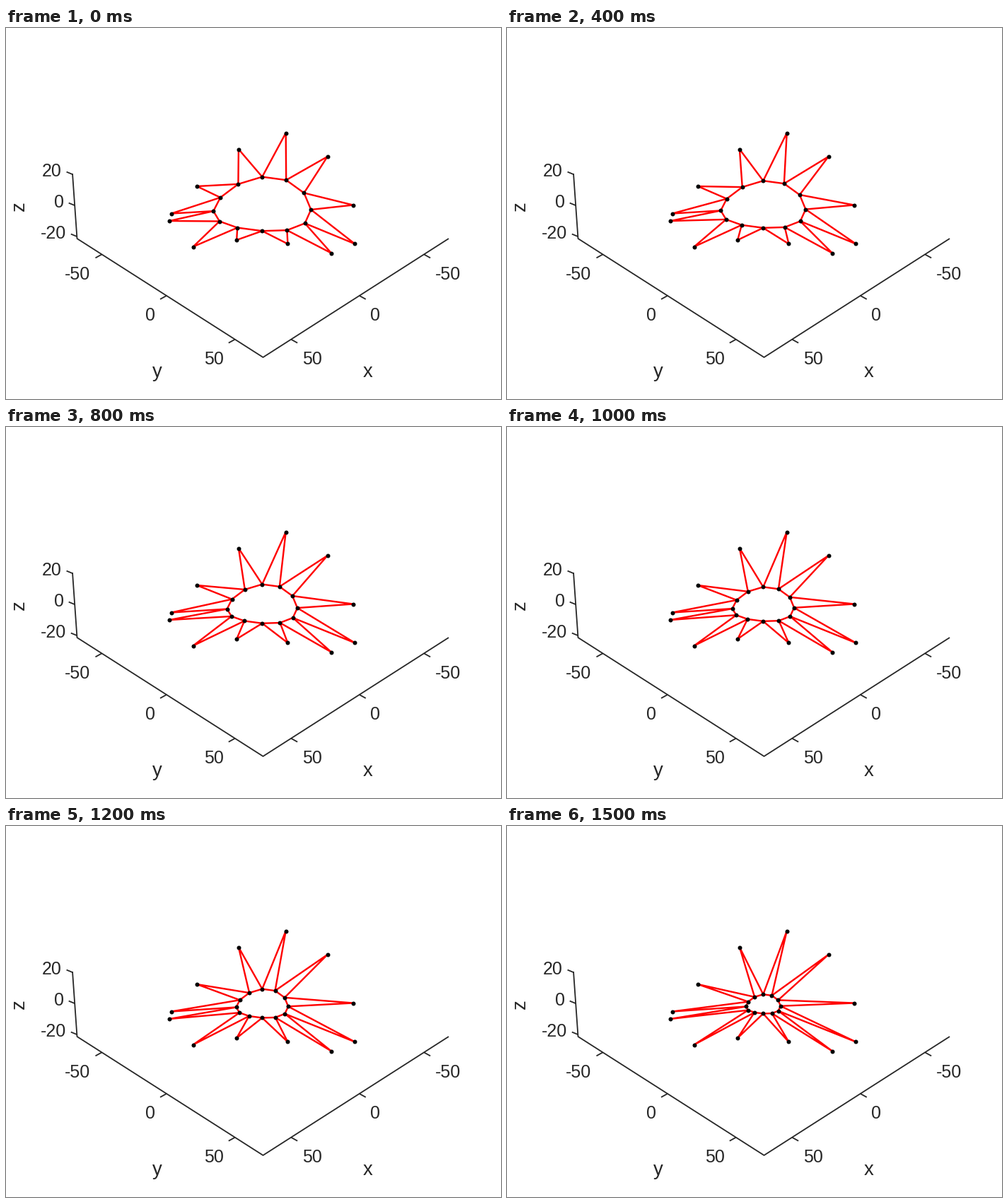
Write a matplotlib script that moves like this. It is 700 by 525 pixels and loops after 1600 ms.

```python
import numpy as np
import matplotlib.pyplot as plt
from matplotlib.animation import FuncAnimation

W, H, DPI = 700, 525, 100
FRAMES, INTERVAL = 16, 100
INK = "#262626"
PX = 72 / DPI  # points per pixel

CENTER = np.array([362.3, 253.5])
N = 12
JOINT_R, TIP_R = 69, 134.3
JOINT_ANGLES = np.arange(N) * 2 * np.pi / N
TIP_ANGLES = JOINT_ANGLES + np.pi / N
# Irregular drop of each spike tip below the base plane
TIP_DROPS = np.array([-33, -18.8, 16.3, 32.7, 12.3, -20,
                      -25.5, 3.3, 0.2, 28.3, 23.2, -10])

fig = plt.figure(figsize=(W / DPI, H / DPI), dpi=DPI, facecolor="white")
ax = fig.add_axes([0, 0, 1, 1])
ax.set_xlim(0, W)
ax.set_ylim(H, 0)
ax.axis("off")


def stroke(points, color=INK, width=1.8):
    x, y = np.transpose(points)
    return ax.plot(x, y, color=color, lw=width * PX,
                   solid_capstyle="butt", solid_joinstyle="round")[0]


def label(x, baseline, text, size=25, ha="center", **kw):
    ax.text(x, baseline, text, fontsize=size * PX, color=INK, ha=ha,
            va="baseline", family="Liberation Sans", **kw)


def ticked_axis(start, end, values, place, tick, offset, ha):
    """Ticks and numbers on the line start-end; place maps value to 0..1."""
    start, end = np.array(start), np.array(end)
    for v in values:
        p = start + place(v) * (end - start)
        stroke([p, p + tick])
        label(*(p + offset), str(v), ha=ha)


def project(angle, radius, drop):
    """Tilted circle on screen, slightly wider towards the viewer."""
    x = radius * np.sin(angle) * (1 - 0.0003 * radius * np.cos(angle))
    y = -0.555 * radius * np.cos(angle) + drop
    return CENTER + np.stack([x, y], axis=1)


def joints_at(scale):
    r = JOINT_R * scale
    a = JOINT_ANGLES
    saddle = -r * (0.077 * np.cos(2 * a - 0.53) + 0.015 * np.sin(a))
    return project(a, r, saddle)


def closed_loop(points):
    return np.vstack([points, points[:1]])


# Axes
TOP, LEFT, CORNER, RIGHT = (94, 206), (100.5, 298), (363.5, 466), (626, 298)
stroke([TOP, LEFT, CORNER, RIGHT])


def depth(v):
    return 0.481 + 0.00716 * v + 4e-6 * v * v


ticked_axis(TOP, LEFT, (20, 0, -20), lambda v: 0.49 - 0.0239 * v,
            (-8.5, -3.5), (-15.5, 3), "right")
ticked_axis(LEFT, CORNER, (-50, 0, 50), depth, (-9, 5), (-16, 35.5), "right")
ticked_axis(RIGHT, CORNER, (-50, 0, 50), depth, (9, 5), (15.5, 35.5), "left")
label(214, 494, "y", 27.5)
label(512, 494, "x", 27.5)
label(26, 252, "z", 27.5, rotation=90, rotation_mode="anchor")

# Linkage
tips = project(TIP_ANGLES, TIP_R, TIP_DROPS)
spikes = stroke(tips, "red", 2.4)
ring = stroke(tips, "red", 2.4)
dots, = ax.plot([], [], "o", color="black", ms=6 * PX, mew=0)


def update(i):
    # The ring closes steadily, then ever faster
    joints = joints_at(1 - 0.0317 * i - 5e-5 * i ** 3)
    zigzag = np.stack([joints, tips], axis=1).reshape(-1, 2)
    ring.set_data(*closed_loop(joints).T)
    spikes.set_data(*closed_loop(zigzag).T)
    dots.set_data(*zigzag.T)
    return spikes, ring, dots


anim = FuncAnimation(fig, update, frames=FRAMES, interval=INTERVAL,
                     repeat=True, repeat_delay=0)
plt.show()
```
